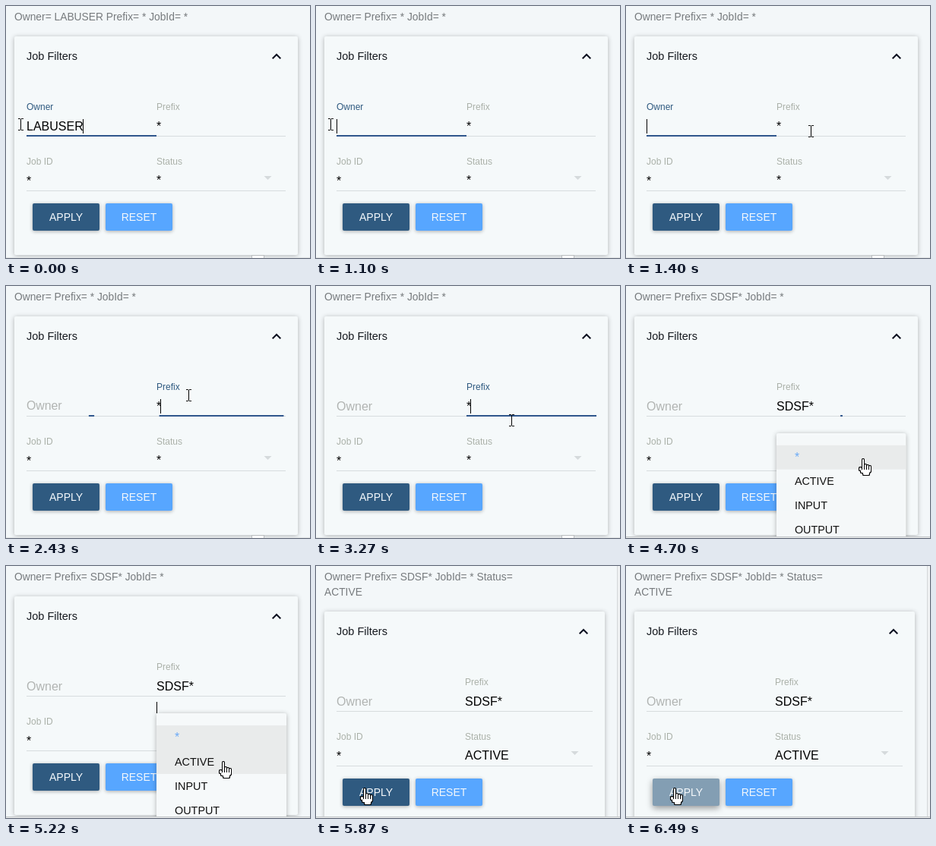
An HTML page with a canvas for the animation above (6890 ms loop, 400 by 332 pixels).

```html
<!DOCTYPE html>
<html lang="en">
<head>
<meta charset="utf-8">
<title>Job filters</title>
<style>
html, body { margin: 0; width: 100%; height: 100%; overflow: hidden; background: #f3f7f9; }
canvas { display: block; width: 400px; height: 332px; }
</style>
</head>
<body>
<canvas id="stage"></canvas>
<script>
const W = 400, H = 332, LOOP = 6890;
const canvas = document.getElementById('stage');
const ctx = canvas.getContext('2d');
const ratio = window.devicePixelRatio || 1;
canvas.width = W * ratio;
canvas.height = H * ratio;

const FONT = '"Liberation Sans", Arial, sans-serif';
const NAVY = '#2f5a80', LINE_BLUE = '#2f568c', BLUE = '#57a6ff', GREY = '#d7dcde', LABEL = '#abb1a9';
const USER = 'LABUSER';

// Moments of the story, in ms
const SELECT = 150, CLEAR = 1100, FOCUS = 2220, ERASE = 3570, TYPE = 4120;
const BLUR = 4500, PICK = 5470, REFLOW = 5550, PRESS = 6040, RAISE = 6490;

// Pointer moves: from and until when, and where to
const HOME = { x: 19, y: 156 };
const MOVES = [
  { from: CLEAR, to: 1400, x: 243, y: 165 },
  { from: 1500, to: 1800, x: 246, y: 156 },
  { from: 2180, to: 2430, x: 240, y: 144 },
  { from: 2500, to: 2790, x: 257, y: 177 },
  { from: 4400, to: 4600, x: 312, y: 228 },
  { from: 4770, to: 5070, x: 286, y: 258 },
  { from: REFLOW, to: 5870, x: 64, y: 293 }
];

const clamp = v => Math.max(0, Math.min(1, v));
const progress = (t, from, to) => clamp((t - from) / (to - from));
const smooth = p => p * p * (3 - 2 * p);
const easeOut = (t, from, dur) => 1 - (1 - progress(t, from, from + dur)) ** 5;
const lerp = (a, b, p) => a + (b - a) * p;
const within = (t, a, b) => t >= a && t < b;

function pointerAt(t) {
  let { x, y } = HOME;
  for (const move of MOVES) {
    const p = smooth(progress(t, move.from, move.to));
    x = lerp(x, move.x, p);
    y = lerp(y, move.y, p);
  }
  return [Math.round(x), Math.round(y)];
}

function rect(x, y, w, h, color) {
  ctx.fillStyle = color;
  ctx.fillRect(x, y, w, h);
}

function rounded(x, y, w, h, r, color) {
  ctx.beginPath();
  ctx.roundRect(x, y, w, h, r);
  ctx.fillStyle = color;
  ctx.fill();
}

function text(str, x, y, size, color, align = 'left') {
  ctx.font = size + 'px ' + FONT;
  ctx.textAlign = align;
  ctx.fillStyle = color;
  ctx.fillText(str, x, y);
  return ctx.measureText(str).width;
}

function panel(x, y, w, h, color, blur = 5, alpha = 0.28, drop = 1) {
  ctx.save();
  ctx.shadowColor = `rgba(0,0,0,${alpha})`;
  ctx.shadowBlur = blur * ratio;
  ctx.shadowOffsetY = drop * ratio;
  rounded(x, y, w, h, 2, color);
  ctx.restore();
}

function caret(x, y = 149, h = 19) {
  rect(Math.floor(x), y, 1, h, '#000');
}

function focusLine(x, w, amount) {
  const len = w * amount;
  if (len > 0.5) rect(x + (w - len) / 2, 170, len, 2, LINE_BLUE);
}

function ibeam(x, y) {
  rect(x, y - 7, 1, 14, '#000');
  for (const edge of [y - 8, y + 7]) {
    rect(x - 3, edge, 3, 1, '#000');
    rect(x + 1, edge, 3, 1, '#000');
  }
}

// Black silhouette first, then the same shape one pixel smaller in white
function hand(x, y) {
  for (const [inset, color] of [[0, '#000'], [1, '#fff']]) {
    const part = (px, py, w, h) =>
      rounded(x + px + inset, y + py + inset, w - 2 * inset, h - 2 * inset, 1.5, color);
    part(-6, 10, 5, 6);
    part(-4, 13, 14, 6);
    part(-1, 14, 10, 8);
    for (let i = 3; i >= 0; i--) part(-2 + 3 * i, i ? 5 + i : -1, 4, i ? 13 - i : 17);
  }
}

function headerLines(t, prefix) {
  const owner = t < CLEAR ? USER + ' ' : '';
  const line = `Owner= ${owner}Prefix= ${t < TYPE ? '*' : prefix} JobId= *`;
  return t < REFLOW ? [line] : [line + ' Status=', 'ACTIVE'];
}

function prefixAt(t) {
  if (t < ERASE) return '*';
  return 'SDSF*'.slice(0, Math.max(0, 1 + Math.floor((t - TYPE) / 80)));
}

function drawOwner(t, w) {
  const sink = easeOut(t, FOCUS, 450);
  text('Owner', 27, lerp(137, 164, sink), lerp(12, 16, sink), t < FOCUS ? NAVY : '#b1b4b2');
  focusLine(27, w, 1 - sink);
  if (t >= CLEAR) {
    if (t < FOCUS) caret(27);
    return;
  }
  ctx.font = '16px ' + FONT;
  const width = ctx.measureText(USER).width;
  const selected = t >= SELECT;
  if (selected) rect(27, 149, width, 19, '#0078d7');
  else caret(27 + width);
  text(USER, 27, 164, 16, selected ? '#fff' : '#000');
}

function drawPrefix(t, x, w, value) {
  const focused = within(t, FOCUS, BLUR);
  text('Prefix', x, 137, 12, focused ? NAVY : LABEL);
  focusLine(x, w + 1, easeOut(t, FOCUS, 450) - easeOut(t, BLUR, 360));
  const width = text(value, x, 164, 16, '#000');
  const hidden = within(t, 2790, 3270) || within(t, 3800, TYPE);
  if (focused && !hidden) caret(x + width - 0.7);
}

function button(label, x, color, raised) {
  panel(x, 260, 88, 36, color, raised ? 9 : 5, raised ? 0.4 : 0.32, raised ? 3 : 1);
  text(label, x + 44, 283, 14, '#f4f8fb', 'center');
}

function drawMenu(t) {
  const open = easeOut(t, BLUR, 330);
  if (open <= 0 || t >= REFLOW) return;
  ctx.save();
  ctx.globalAlpha = t < PICK ? open : 1 - progress(t, PICK, REFLOW);
  ctx.translate(198, 194);
  ctx.scale(lerp(0.6, 1, open), open);
  panel(0, 0, 171, 170, '#f6f9fa', 6, 0.3);
  rect(0, 16, 171, t < 4990 ? 32 : 64, '#e9ebeb');
  text('*', 24, 37, 16, '#6aa9f7');
  ['ACTIVE', 'INPUT', 'OUTPUT'].forEach((name, i) => text(name, 24, 69 + 32 * i, 14.4, '#111'));
  ctx.restore();
  if (t >= 4840) caret(198, 179, 15);
}

function drawCard(t, prefix) {
  const moved = t >= REFLOW;
  const right = moved ? 364 : 368;
  const mid = moved ? 196 : 198;
  ctx.save();
  ctx.translate(0, moved ? 20 : 0);
  panel(11, 40, right + 5, 288, '#f5f9fa', 6);
  text('Job Filters', 27, 71, 14.5, '#15191f');

  const cx = right - 12;
  ctx.beginPath();
  ctx.moveTo(cx - 5.3, 69.3);
  ctx.lineTo(cx, 64);
  ctx.lineTo(cx + 5.3, 69.3);
  ctx.strokeStyle = '#0b1020';
  ctx.lineWidth = 2;
  ctx.stroke();

  for (const y of [171, 243]) rect(27, y, right - 27, 1, GREY);
  drawOwner(t, mid - 27);
  drawPrefix(t, mid, right - mid, prefix);
  text('Job ID', 27, 209, 12, LABEL);
  text('*', 27, 236, 16, '#000');
  text('Status', mid, 209, 12, LABEL);
  text(t < PICK ? '*' : 'ACTIVE', mid, 234.5, 16, '#000');

  const ax = right - 23.5;
  ctx.beginPath();
  ctx.moveTo(ax - 5, 224);
  ctx.lineTo(ax + 5, 224);
  ctx.lineTo(ax, 229);
  ctx.fillStyle = '#d5dadc';
  ctx.fill();

  const pressed = t < PRESS ? NAVY : t < PRESS + 80 ? '#5c7f9b' : '#839eb3';
  button('APPLY', 35, pressed, t >= RAISE);
  button('RESET', 131, BLUE, false);
  ctx.restore();
}

function drawEdges(t) {
  if (t < BLUR) {
    rect(0, 331, W, 1, '#e2e5e6');
    rect(323, 328, 17, 4, '#b9bdbf');
    rect(324, 329, 15, 3, '#fbfcfc');
    return;
  }
  rect(0, 330, W, 1, '#c3c6c8');
  rect(0, 331, W, 1, '#e9ebec');
  if (t >= REFLOW) {
    rect(396, 0, 1, 330, '#d3d7d9');
    rect(397, 0, 3, 330, '#f0f2f3');
  }
}

function draw(t) {
  const prefix = prefixAt(t);
  ctx.setTransform(ratio, 0, 0, ratio, 0, 0);
  rect(0, 0, W, H, '#f3f7f9');
  headerLines(t, prefix).forEach((line, i) => text(line, 11, 19 + 20 * i, 13.8, '#777b7e'));
  drawCard(t, prefix);
  drawMenu(t);
  drawEdges(t);
  const pointer = t < BLUR ? ibeam : hand;
  pointer(...pointerAt(t));
}

const start = performance.now();
function frame() {
  draw((performance.now() - start) % LOOP);
  requestAnimationFrame(frame);
}
frame();
</script>
</body>
</html>
```
